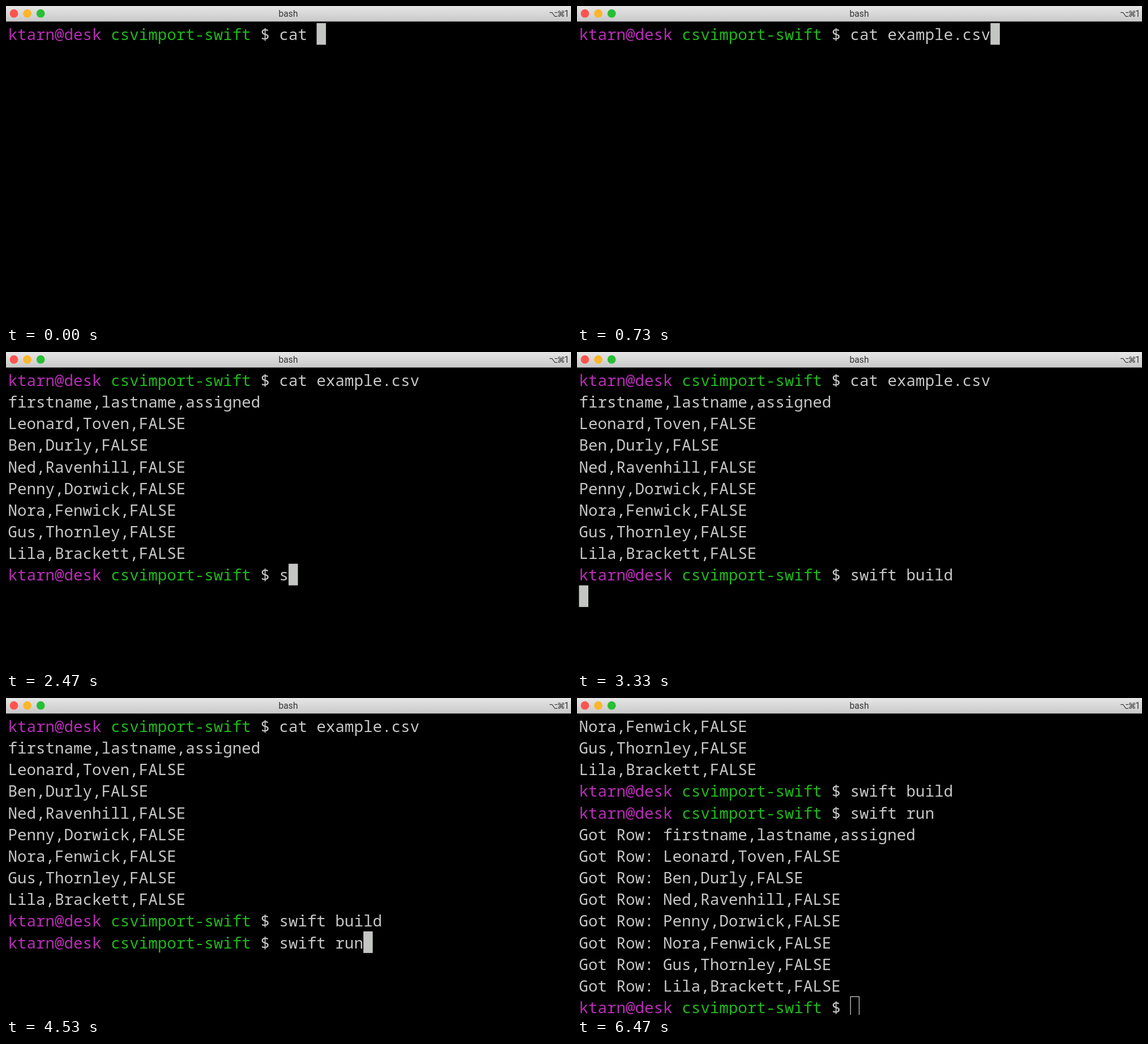
These frames come from a looping animation (998 px wide and 561 px high, 7 s). An HTML page with a canvas:

```html
<!DOCTYPE html>
<html lang="en">
<head>
<meta charset="utf-8">
<title>bash</title>
<style>
html, body { margin: 0; width: 100%; height: 100%; overflow: hidden; background: #000; }
canvas { display: block; }
</style>
</head>
<body>
<canvas id="stage" width="998" height="561"></canvas>
<script>
const ctx = document.getElementById('stage').getContext('2d');
const W = 998, H = 561, LOOP = 7000;
const LEFT = 3.5, TOP = 30.2, CELL = 16.52, ROW = 38.15, ROWS = 14, CLIP = 559;
const FONT = `${CELL / 0.6}px "Noto Sans Mono", "DejaVu Sans Mono", monospace`;
const WHITE = '#c7c7c7', MAGENTA = '#b92db7', GREEN = '#1fb91b', CURSOR = '#c4c6c3';

const USER = 'ktarn@desk', DIR = 'csvimport-swift';
const INDENT = `${USER} ${DIR} $ `.length;
const PEOPLE = [
  'Leonard,Toven', 'Ben,Durly', 'Ned,Ravenhill', 'Penny,Dorwick',
  'Nora,Fenwick', 'Gus,Thornley', 'Lila,Brackett'
];
const CSV = ['firstname,lastname,assigned', ...PEOPLE.map(p => p + ',FALSE')];

// keys: [time, characters typed]; enter: command runs; done: output and next prompt
const COMMANDS = [
  { text: 'cat example.csv', enter: 930, done: 930, output: CSV,
    keys: [[0, 4], [270, 5], [340, 6], [400, 8], [470, 9], [530, 11], [600, 12], [670, 14], [730, 15]] },
  { text: 'swift build', enter: 3330, done: 3670, output: [],
    keys: [[2470, 1], [2530, 3], [2600, 5], [2730, 6], [2870, 8], [3000, 11]] },
  { text: 'swift run', enter: 4600, done: 4600, output: CSV.map(r => 'Got Row: ' + r),
    keys: [[4070, 1], [4130, 2], [4200, 3], [4270, 4], [4330, 6], [4400, 7], [4470, 8], [4530, 9]] },
  { text: '', enter: LOOP, done: LOOP, output: [], keys: [] }
];
const BLUR = 6470;

const prompt = text => ({ prompt: true, text });

function typed(cmd, t) {
  let n = 0;
  for (const [time, count] of cmd.keys) if (t >= time) n = count;
  return cmd.text.slice(0, n);
}

function screenAt(t) {
  const lines = [];
  for (const cmd of COMMANDS) {
    const text = typed(cmd, t);
    lines.push(prompt(text));
    if (t < cmd.enter) return { lines, col: INDENT + text.length };
    if (t < cmd.done) {
      lines.push({ text: '' });
      return { lines, col: 0 };
    }
    lines.push(...cmd.output.map(text => ({ text })));
  }
}

function put(text, col, row, color) {
  ctx.fillStyle = color;
  ctx.fillText(text, LEFT + col * CELL, TOP + row * ROW + 29.8);
}

function drawLine(line, row) {
  if (!line.prompt) return put(line.text, 0, row, WHITE);
  put(USER, 0, row, MAGENTA);
  put(DIR, USER.length + 1, row, GREEN);
  put('$ ' + line.text, INDENT - 2, row, WHITE);
}

function drawCursor(col, row, hollow) {
  const x = LEFT + col * CELL, y = TOP + row * ROW;
  if (hollow) {
    ctx.strokeStyle = WHITE;
    ctx.lineWidth = 1.3;
    ctx.strokeRect(x + 0.5, y + 0.7, CELL - 1.2, ROW - 1);
  } else {
    ctx.fillStyle = CURSOR;
    ctx.fillRect(x, y, CELL, ROW);
  }
}

function label(text, x, y, font) {
  ctx.font = font;
  ctx.fillText(text, x, y);
}

function drawTitleBar() {
  const shade = ctx.createLinearGradient(0, 0, 0, 27);
  shade.addColorStop(0, '#e6e6e6');
  shade.addColorStop(1, '#c9c9c9');
  ctx.fillStyle = shade;
  ctx.fillRect(0, 0, W, 27.4);
  ['#fc544f', '#fdb52b', '#28bf35'].forEach((color, i) => {
    ctx.fillStyle = color;
    ctx.beginPath();
    ctx.arc(14 + i * 23.6, 13.2, 7.4, 0, Math.PI * 2);
    ctx.fill();
  });
  ctx.fillStyle = '#363636';
  ctx.textAlign = 'center';
  const sans = '15.7px Roboto, sans-serif', symbols = '14px "DejaVu Sans", sans-serif';
  label('bash', 498.5, 19, sans);
  label('\u2325', 967, 19, symbols);
  label('\u2318', 980.5, 19, symbols);
  label('1', 990.5, 19, sans);
  ctx.textAlign = 'left';
}

function draw(t) {
  ctx.fillStyle = '#000';
  ctx.fillRect(0, 0, W, H);
  const { lines, col } = screenAt(t);
  const visible = lines.slice(-ROWS);
  ctx.save();
  ctx.beginPath();
  ctx.rect(0, 27, W, CLIP - 27);
  ctx.clip();
  ctx.font = FONT;
  visible.forEach(drawLine);
  drawCursor(col, visible.length - 1, t >= BLUR);
  ctx.restore();
  drawTitleBar();
}

const start = performance.now();
function tick() {
  draw((performance.now() - start) % LOOP);
  requestAnimationFrame(tick);
}
tick();
</script>
</body>
</html>
```
